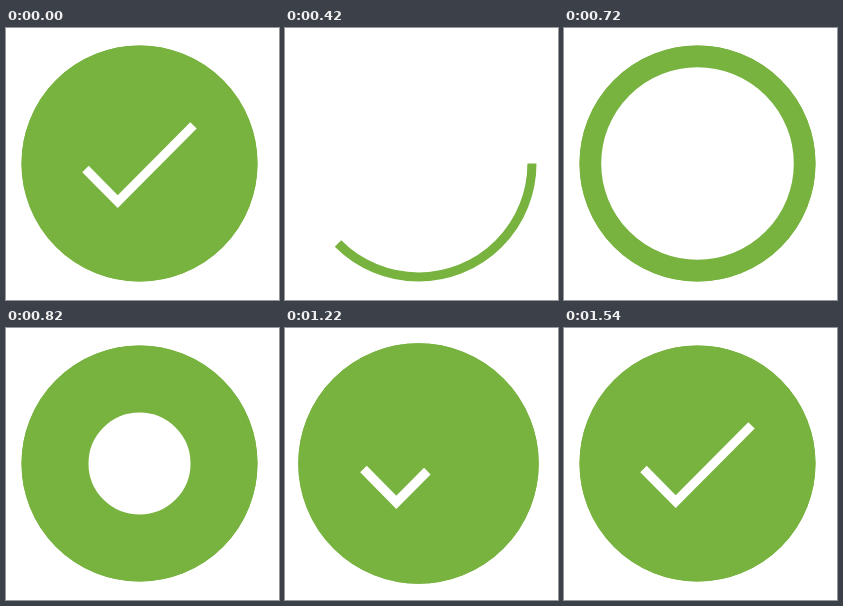
Animation, 273 px wide and 272 px high, one loop 1.88 s. Source, as an HTML page:

```html
<!DOCTYPE html>
<html lang="en">
<head>
<meta charset="utf-8">
<title>Success checkmark</title>
<style>
  html, body { margin: 0; width: 100%; height: 100%; overflow: hidden; background: #fff; }
  svg { display: block; fill: none; stroke: #78b340; stroke-width: 2; }
  #check { stroke: #fff; }
</style>
</head>
<body>
<svg width="273" height="272" viewBox="0 0 273 272">
  <g id="badge">
    <circle id="fill"/>
    <circle id="ring" r="25"/>
    <path id="check" d="M-11.9 1.2l7.1 7.2 16.7-16.8"/>
  </g>
</svg>
<script>
const LOOP = 1880, STEP = 20, UNIT = 118 / 26;
const [badge, fill, ring, check] =
  ['badge', 'fill', 'ring', 'check'].map(id => document.getElementById(id));

// Cubic Bézier easing with control points (x1, 0) and (x2, 1).
const bezier = (x1, x2) => x => {
  if (x <= 0) return 0;
  if (x >= 1) return 1;
  let lo = 0, hi = 1, s;
  for (let i = 0; i < 24; i++) {
    s = (lo + hi) / 2;
    const at = 3 * x1 * s * (1 - s) ** 2 + 3 * x2 * s * s * (1 - s) + s ** 3;
    if (at < x) lo = s; else hi = s;
  }
  return s * s * (3 - 2 * s);
};
const strokeEase = bezier(0.65, 0.45);
const easeInOut = bezier(0.42, 0.58);

const dash = (el, length) => el.setAttribute('stroke-dasharray', `${length} 400`);

function draw(time) {
  // The finished badge lingers for the first step of each loop.
  const t = time < STEP ? LOOP : time;

  dash(ring, 166 * strokeEase((t - 86) / 702));
  dash(check, 48 * strokeEase((t - 1040) / 360));

  const inset = Math.min(26, 27.86 * easeInOut((t - 595) / 435));
  fill.setAttribute('r', 26 - inset / 2);
  fill.style.strokeWidth = inset;

  const pulse = (t - 1165) / 365;
  const scale = UNIT * (1 + 0.1 * easeInOut(1 - Math.abs(2 * pulse - 1)));
  badge.setAttribute('transform', `translate(133.5 135.5) scale(${scale})`);
}

const start = performance.now();
function tick() {
  const time = (performance.now() - start) % LOOP;
  draw(Math.floor(time / STEP) * STEP);
  requestAnimationFrame(tick);
}
tick();
</script>
</body>
</html>
```
